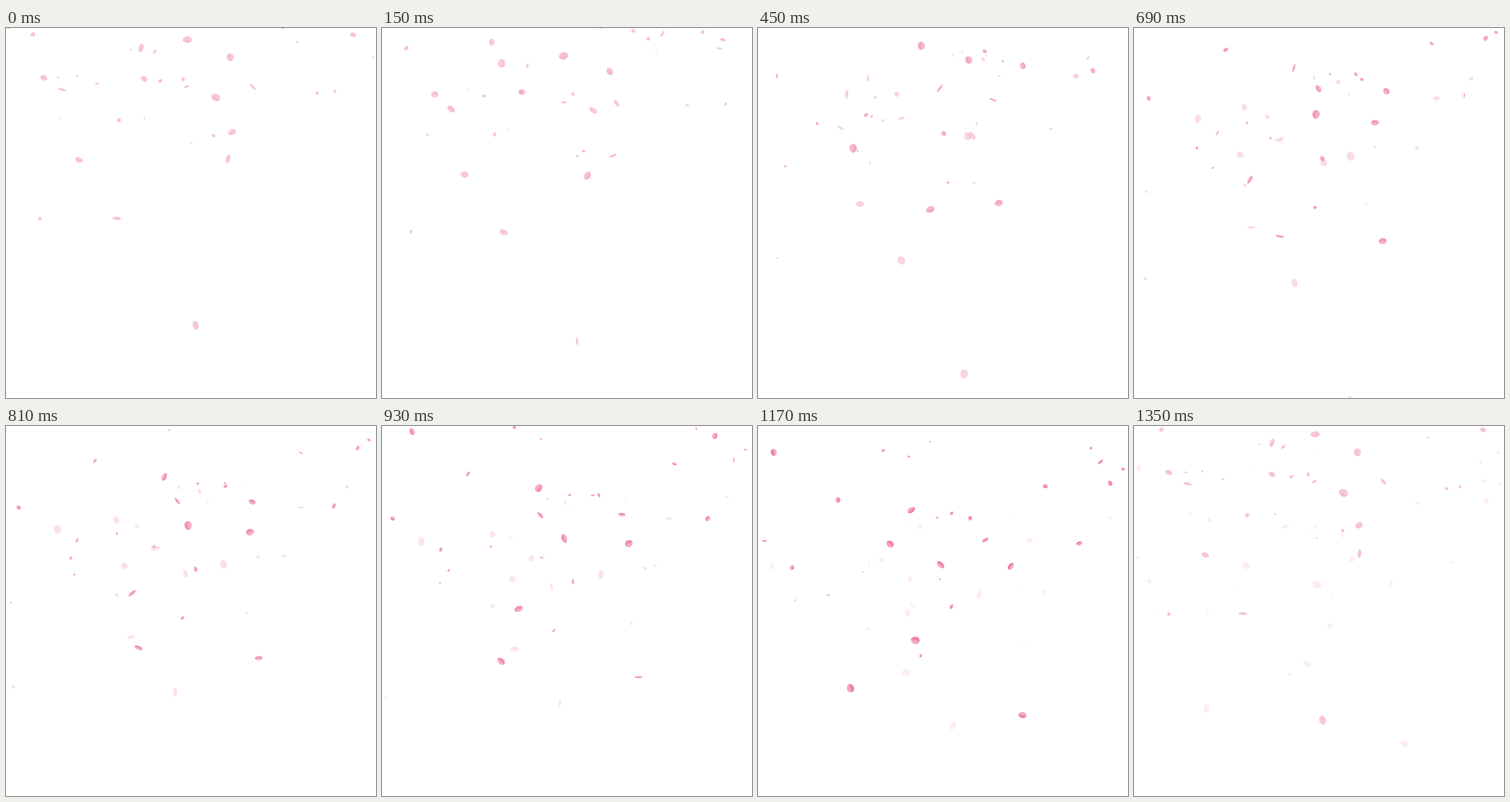
Recreate the animation shown at these times as an HTML page with a canvas. Size 480 by 480 pixels, loop 1.38 s.

```html
<!DOCTYPE html>
<html lang="en">
<head>
<meta charset="utf-8">
<title>Falling petals</title>
<style>
html, body { margin: 0; width: 100%; height: 100%; overflow: hidden; background: #fff; }
canvas { display: block; width: 480px; height: 480px; }
</style>
</head>
<body>
<canvas id="stage" width="480" height="480"></canvas>
<script>
const ctx = document.getElementById('stage').getContext('2d');
const SIZE = 480, LOOP = 1380, STEP = 30, SPAN = 1170, SWAP = 1190;

const clamp = v => Math.max(0, Math.min(1, v));
const mix = (a, b, k) => a + (b - a) * k;

function seededRandom(seed) {
  return () => {
    seed = (seed + 0x6D2B79F5) | 0;
    let v = Math.imul(seed ^ (seed >>> 15), 1 | seed);
    v = (v + Math.imul(v ^ (v >>> 7), 61 | v)) ^ v;
    return ((v ^ (v >>> 14)) >>> 0) / 4294967296;
  };
}

// Larger petals fall faster; every petal tumbles at its own rate.
function makePetal(random, x, y, length) {
  return {
    x, y, length,
    dx: mix(-180, 160, random()),
    dy: mix(90, 150, random()) + length * 4,
    angle: random() * Math.PI * 2,
    spin: mix(-1, 1, random()) / 380,
    phase: random() * Math.PI * 2,
    flip: 1 / mix(190, 340, random())
  };
}

// A few leading petals follow fixed paths, the rest are scattered.
function makeGroup({ seed, count, leaders, top, depth, skew }) {
  const random = seededRandom(seed);
  const petals = leaders.map(([x, y, endX, endY]) => ({
    ...makePetal(random, x, y, mix(10, 12.5, random())),
    dx: endX - x,
    dy: endY - y
  }));
  for (let i = 0; i < count; i++) {
    const x = SIZE * (i + random()) / count;
    const y = top + depth * random() ** skew;
    petals.push(makePetal(random, x, y, mix(3, 11, random() ** 1.3)));
  }
  return petals;
}

const strengthening = {
  petals: makeGroup({
    seed: 12, count: 28, top: -125, depth: 290, skew: 1.5,
    leaders: [
      [291, 38, 328, 182], [288, 170, 120, 340], [73, 80, 204, 278],
      [235, 15, 237, 180], [293, 135, 343, 375], [220, -31, 199, 109]
    ]
  }),
  opacity: [0.5, 1],
  endOpacity: 0.14,
  hueShift: 0
};
const fading = {
  petals: makeGroup({
    seed: 31, count: 20, top: -20, depth: 330, skew: 1.7,
    leaders: [
      [175, 26, 19, 182], [272, 90, 287, 219],
      [144, 247, 253, 389], [246, 386, 302, 550]
    ]
  }),
  opacity: [0.5, 0.15],
  endOpacity: 0,
  hueShift: -14
};

function groupAlpha({ opacity, endOpacity }, age) {
  const appear = clamp((age + LOOP - SWAP) / 160);
  const drift = mix(...opacity, clamp(age / SPAN));
  const leave = mix(1, endOpacity, clamp((age - SWAP) / 160));
  return appear * drift * leave;
}

function petalSide(length, width, side) {
  ctx.moveTo(0, -length / 2);
  ctx.bezierCurveTo(side * width * 0.68, -length * 0.42,
    side * width * 0.66, length * 0.32, 0, length / 2);
}

function drawPetal(petal, age, hue, alpha) {
  const { x, y, dx, dy, length, angle, spin, phase, flip } = petal;
  const turn = Math.cos(phase + flip * age);
  const width = length * mix(0.2, 0.82, Math.abs(turn));
  ctx.save();
  ctx.translate(x + dx * age / SPAN, y + dy * age / SPAN);
  ctx.rotate(angle + spin * age);
  ctx.globalAlpha = alpha;
  ctx.fillStyle = `hsl(${hue} 78% 72%)`;
  ctx.beginPath();
  petalSide(length, width, -1);
  petalSide(length, width, 1);
  ctx.fill();
  ctx.globalAlpha = alpha * 0.32;
  ctx.fillStyle = '#fff';
  ctx.beginPath();
  petalSide(length, width, turn < 0 ? -1 : 1);
  ctx.fill();
  ctx.restore();
}

function drawGroup(group, age) {
  const alpha = groupAlpha(group, age);
  if (alpha <= 0) return;
  const hue = 340 + group.hueShift * clamp(age / LOOP);
  for (const petal of group.petals) drawPetal(petal, age, hue, alpha);
}

const start = performance.now();
function render(now) {
  const elapsed = Math.max(0, now - start) % LOOP;
  const time = Math.floor(elapsed / STEP) * STEP;
  ctx.fillStyle = '#fff';
  ctx.fillRect(0, 0, SIZE, SIZE);
  for (const group of [fading, strengthening]) {
    drawGroup(group, time);
    if (time > SWAP) drawGroup(group, time - LOOP);
  }
  requestAnimationFrame(render);
}
render(start);
</script>
</body>
</html>
```
